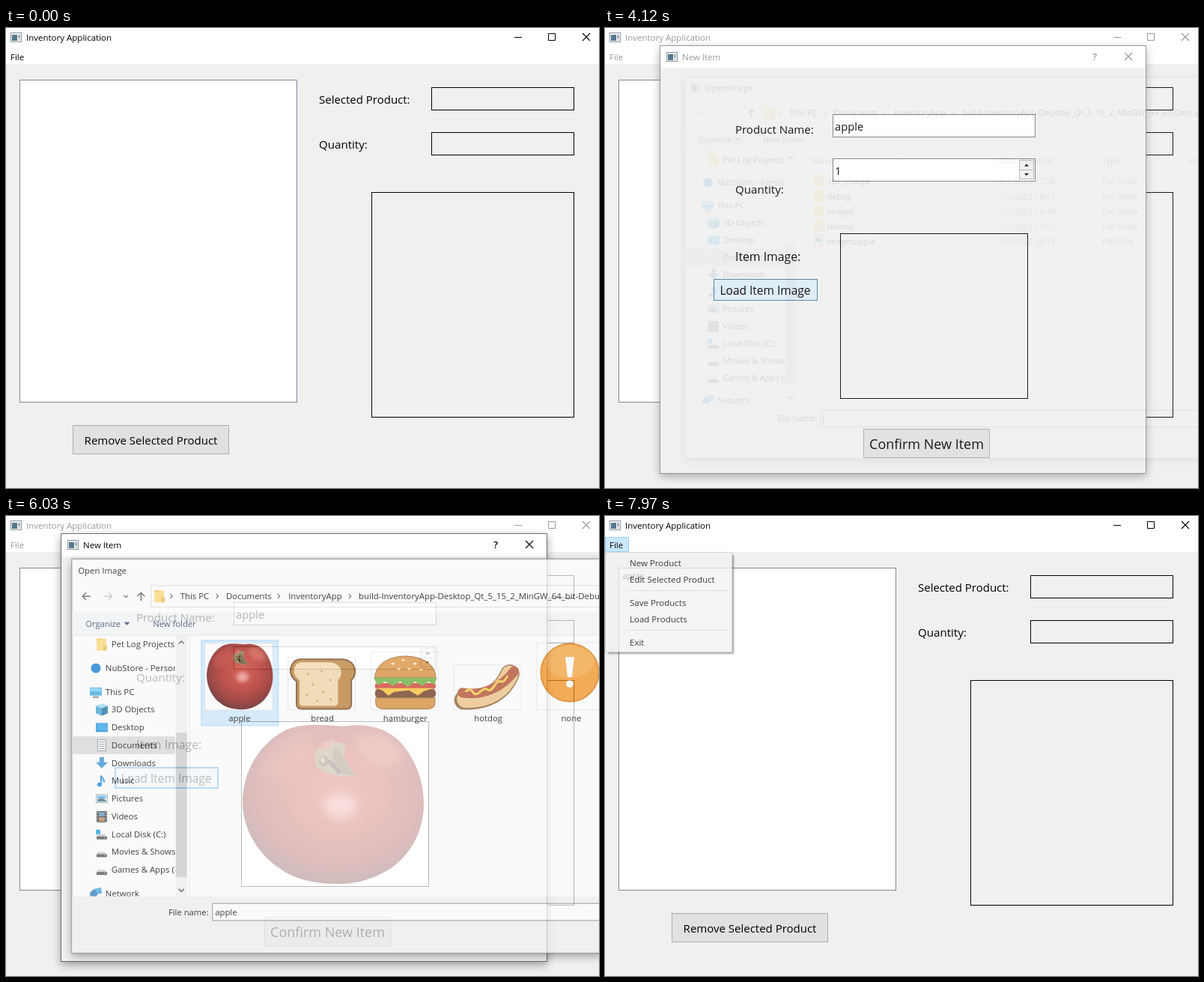
An HTML page that plays this animation: 792 px wide and 614 px high, repeating every 8 s.

```html
<!DOCTYPE html>
<html lang="en">
<head>
<meta charset="utf-8">
<title>Inventory Application</title>
<style>
  html, body { margin: 0; width: 100%; height: 100%; overflow: hidden; background: #f0f0f0; }
  svg { display: block; width: 792px; height: 614px; }
  text { font-family: "Open Sans", "Noto Sans", sans-serif; white-space: pre; }
</style>
</head>
<body>
<svg id="stage" viewBox="0 0 792 614" xmlns="http://www.w3.org/2000/svg"></svg>
<script>
const LOOP = 8000;
const BLUE = '#0078d7';

// Markup helpers
const rect = (x, y, w, h, fill, extra = '') =>
  `<rect x="${x}" y="${y}" width="${w}" height="${h}" fill="${fill}" ${extra}/>`;
const box = (x, y, w, h, fill, stroke, extra = '') =>
  rect(x + .5, y + .5, w, h, fill, `stroke="${stroke}" ${extra}`);
const text = (x, y, s, size = 11.5, extra = '') =>
  `<text x="${x}" y="${y}" font-size="${size}" ${extra}>${s}</text>`;
const line = (d, stroke = '#000', width = 1, extra = '') =>
  `<path d="${d}" fill="none" stroke="${stroke}" stroke-width="${width}" ${extra}/>`;
const shape = (d, fill, extra = '') => `<path d="${d}" fill="${fill}" ${extra}/>`;
const oval = (x, y, rx, ry, fill, extra = '') =>
  `<ellipse cx="${x}" cy="${y}" rx="${rx}" ry="${ry}" fill="${fill}" ${extra}/>`;
const group = (id, body, extra = '') => `<g id="${id}" ${extra}>${body}</g>`;
const centered = 'text-anchor="middle"';
const cross = (x, y) => line(`M${x} ${y}l10 10m0 -10l-10 10`, 'currentColor', 1.1);
const chevron = (x, y) => line(`M${x - 1.5} ${y - 3}l3 3l-3 3`, '#555', 1.2);

const appIcon = (x, y) => box(x, y, 14, 12, '#f6f7f8', '#8d949a') +
  rect(x + 2, y + 3, 7, 8, '#53798c') + rect(x + 10, y + 3, 3, 5, '#a9b4bb') +
  rect(x + 10, y + 9, 3, 2, '#ced4d8');
const folder = (x, y) => rect(x, y, 13, 16, '#ffd978', 'rx="1"') +
  shape(`M${x + 9} ${y + 9}h5v7h-5z`, '#edbd4f') + rect(x, y, 6, 2, '#f2c65a');

const shadow = (id, x, y, w, h) =>
  rect(x, y + 4, w, h, '#000', `id="${id}" filter="url(#soft)"`);

// Apple drawn at the size of the preview box
const apple =
  shape(`M316 375C320 330 345 300 375 285C400 276 430 279 450 281C480 276 505 282 525 300
    C548 325 558 355 558 385C558 430 530 465 500 478C480 488 460 492 437 491
    C410 490 385 485 365 470C335 450 314 415 316 375Z`, 'url(#skin)') +
  oval(375, 322, 42, 22, '#d8372a', 'opacity=".4" filter="url(#blur)" transform="rotate(-35 375 322)"') +
  oval(500, 312, 34, 20, '#e2604c', 'opacity=".55" filter="url(#blur)" transform="rotate(25 500 312)"') +
  oval(447, 387, 22, 16, '#f0a09a', 'opacity=".85" filter="url(#blur)"') +
  shape('M412 318C418 303 440 296 456 307C446 315 455 333 467 345C448 350 429 345 414 334Z', '#84693b') +
  shape('M438 309C450 311 453 333 465 345C448 347 440 340 436 331Z', '#594322') +
  shape('M424 301l14 -3l-5 13l-13 2z', '#c1463a') +
  line('M423 327C432 324 436 333 446 343', '#35200f', 5) +
  oval(424, 327, 6, 7, '#3d2a14') + oval(423, 326, 3, 4, '#a48a55');

// Main window
const mainWindow =
  rect(0, 0, 792, 614, '#f0f0f0') + rect(0, 0, 792, 48, '#fff') + appIcon(6, 6) +
  box(0, 28, 31, 19, '#e5f3ff', '#cce8ff', 'id="fileHot"') +
  group('mainBar', text(27, 17, 'Inventory Application', 11.5, 'fill="currentColor"') +
    text(6, 43, 'File', 11.5, 'fill="currentColor"') +
    line('M679 12.5h10M724.5 7.5h9v9h-9z', 'currentColor') + cross(770, 7)) +
  box(18, 69, 370, 430, '#fff', '#828790') +
  rect(20, 71, 367, 17, '#e5f3ff', 'id="listHover"') +
  text(23.5, 84, 'apple', 10.9, 'id="listItem"') +
  text(418, 101, 'Selected Product:', 15) + text(418, 161, 'Quantity:', 15.1) +
  box(568, 79, 190, 30, 'none', '#000') + box(568, 139, 190, 30, 'none', '#000') +
  box(488, 219, 270, 300, 'none', '#000') +
  box(89, 530, 208, 38, '#e1e1e1', '#adadad') +
  text(193.5, 556, 'Remove Selected Product', 15, centered);

const menuItems = [['New Product', 67], ['Edit Selected Product', 89], ['Save Products', 120],
  ['Load Products', 142], ['Exit', 173]];
const menu =
  rect(4, 52, 168, 132, '#000', 'opacity=".45" filter="url(#menuSoft)"') +
  box(0, 48, 169, 133, '#f2f2f2', '#ccc') +
  rect(3, 52, 164, 22, '#91c9f7', 'id="menuHover"') +
  line('M29 99.5h137M29 152.5h137', '#d7d7d7') +
  menuItems.map(([s, y]) => text(33, y, s)).join('');

// New item window
const itemWindow =
  shadow('itemShadow', 73, 23, 650, 572) +
  box(73, 23, 649, 571, '#f0f0f0', '#6d6d6d', 'id="itemFrame"') +
  rect(74, 24, 648, 30, '#fff') + appIcon(82, 32) +
  group('itemBar', text(103, 43, 'New Item', 11.5, 'fill="currentColor"') +
    text(654, 43, '?', 12.5, `fill="currentColor" font-weight="600" ${centered}`) + cross(694, 33)) +
  text(174, 141, 'Product Name:', 15) + text(174, 221, 'Quantity:', 15.1) +
  text(174, 311, 'Item Image:', 15.8) +
  box(304, 115, 270, 30, '#fff', BLUE, 'id="nameField"') +
  text(307, 137, '', 14.7, 'id="nameText"') + rect(307, 121, 1, 19, '#000', 'id="nameCaret"') +
  box(304, 174, 270, 30, '#fff', '#7a7a7a') + text(307, 196, '1', 15) +
  box(553, 176, 19, 13, '#f0f0f0', '#b4b4b4') + box(553, 189, 19, 12, '#f0f0f0', '#b4b4b4') +
  shape('M560 184.5h6l-3 -3zM560 194h6l-3 3z', '#000') +
  rect(145, 335, 139, 29, '#e1e1e1', 'id="loadButton"') +
  text(214, 356, 'Load Item Image', 15.5, centered) +
  group('preview', rect(315, 275, 249, 219, '#fff') + apple) +
  box(314, 274, 250, 220, 'none', '#000') +
  rect(345, 535, 169, 39, '#e1e1e1', 'id="confirmButton"') +
  text(429.5, 562, 'Confirm New Item', 18, centered);

// Sidebar icons, drawn from the left edge x and the row centre y
const screen = (x, y) => rect(x, y - 6, 16, 11, '#39a9e8') + rect(x + 1, y - 5, 14, 4, '#7fd0f7') +
  rect(x + 4, y + 6, 8, 2, '#6a7b88');
const disk = (x, y) => shape(`M${x + 2} ${y}h10l3 4h-14z`, '#c9ccce') + rect(x + 1, y + 3, 14, 4, '#4b4f53') +
  rect(x + 11, y + 4, 2, 1, '#7ee08a');
const icons = {
  folder: (x, y) => folder(x + 1, y - 8),
  cloud: (x, y) => oval(x + 8, y, 6.5, 6.5, '#0a78d0'),
  pc: screen,
  cube: (x, y) => shape(`M${x} ${y - 5}l8 -3l8 3v10l-8 3l-8 -3z`, '#3ba5d8') +
    shape(`M${x + 8} ${y - 2}l8 -3v10l-8 3z`, '#1c6f9f') + shape(`M${x} ${y - 5}l8 -3l8 3l-8 3z`, '#9adcf2'),
  desk: (x, y) => rect(x, y - 6, 16, 12, '#0f7fcd') + rect(x + 1, y - 5, 14, 9, '#27a3ea'),
  doc: (x, y) => box(x + 2, y - 8, 11, 15, '#fff', '#80878d') +
    line(`M${x + 4} ${y - 4.5}h8m-8 3h8m-8 3h8m-8 3h8`, '#6f8ea6'),
  down: (x, y) => shape(`M${x + 5} ${y - 8}h6v7h5l-8 8l-8 -8h5z`, '#2f8fd6'),
  note: (x, y) => line(`M${x + 7} ${y + 4}v-11c1 4 5 4 4 9`, '#1686d9', 2) + oval(x + 5, y + 5, 3.2, 2.6, '#1686d9'),
  picture: (x, y) => box(x, y - 6, 15, 11, '#fff', '#87949e') + rect(x + 2, y - 4, 12, 4, '#65b6e6') +
    shape(`M${x + 2} ${y + 4}v-3l6 -2l6 3v2z`, '#3d6e84'),
  film: (x, y) => rect(x + 1, y - 7, 14, 15, '#333') + rect(x + 4, y - 6, 8, 6, '#5a8fc0') +
    rect(x + 4, y + 1, 8, 6, '#b87f58') + line(`M${x + 2.5} ${y - 6}v14m11 -14v14`, '#ddd', 1, 'stroke-dasharray="2 2"'),
  system: (x, y) => disk(x, y) + rect(x, y - 6, 6, 6, '#18a0e0'),
  disk,
  net: (x, y) => rect(x + 4, y - 7, 12, 8, '#4aa6dd', `transform="rotate(-12 ${x + 10} ${y - 3})"`) +
    oval(x + 5, y + 1, 5, 5, '#2f7fb8')
};
const places = [[170, 'folder', 'Pet Log Projects', 1], [202, 'cloud', 'NubStore - Personal'], [234, 'pc', 'This PC'],
  [258, 'cube', '3D Objects', 1], [282, 'desk', 'Desktop', 1], [306, 'doc', 'Documents', 1],
  [330, 'down', 'Downloads', 1], [354, 'note', 'Music', 1], [378, 'picture', 'Pictures', 1],
  [402, 'film', 'Videos', 1], [426, 'system', 'Local Disk (C:)', 1], [450, 'disk', 'Movies &amp; Shows', 1],
  [474, 'disk', 'Games &amp; Apps (D:)', 1], [506, 'net', 'Network']];
const sidebar = `<g clip-path="url(#sideClip)">` + rect(82, 294, 139, 24, '#d9d9d9') +
  places.map(([y, icon, label, level = 0]) =>
    icons[icon](106 + 8 * level, y) + text(127 + 8 * level, y + 4, label)).join('') + '</g>' +
  rect(222, 158, 15, 352, '#f0f0f0') + rect(222, 289, 15, 195, '#cdcdcd') +
  line('M226 169l3.5 -3.5l3.5 3.5M226 500l3.5 3.5l3.5 -3.5', '#505050', 1.6) + line('M240.5 158v352', '#e6e6e6');

const crumbs = [[228, 'This PC'], [290, 'Documents'], [374, 'InventoryApp'],
  [469, 'build-InventoryApp-Desktop_Qt_5_15_2_MinGW_64_bit-Debug']];
const navigation =
  group('backArrow', line('M107 105h-11m5 -5l-5 5l5 5', 'currentColor', 1.5)) +
  line('M125 105h11m-5 -5l5 5l-5 5', '#c4c4c4', 1.5) +
  group('recent', line('M151.5 103.5l3 3l3 -3', 'currentColor', 1.2)) +
  line('M175 111v-11m-5 5l5 -5l5 5', '#555', 1.6) +
  box(188, 90, 640, 29, '#fff', '#d9d9d9') + folder(193, 97) +
  [216, 278, 361, 457].map(x => chevron(x, 105)).join('') +
  crumbs.map(([x, s]) => text(x, 109, s)).join('') +
  rect(82, 127, 710, 31, '#f5f6f7') + line('M82 157.5h710', '#e3e5e8') +
  text(100, 146, 'Organize', 11.4, 'fill="#1e395b"') + shape('M152 140h8l-4 4z', '#1e395b') +
  text(191, 146, 'New folder', 11.4, 'fill="#1e395b"');

const files = [['.qtc_clangd', '5/1/2023 13:58'], ['debug', '5/3/2023 18:47'], ['images', '5/3/2023 18:49'],
  ['release', '5/1/2023 14:52'], ['imagesapple', '5/1/2023 20:12']];
const details =
  rect(256, 210, 560, 21, '#e5f3ff', 'id="rowHover"') +
  [[259, 'Name'], [520, 'Date modified'], [664, 'Type'], [784, 'Size']]
    .map(([x, s]) => text(x, 175, s, 11.4, 'fill="#4c5866"')).join('') +
  line('M513.5 158v26M657.5 158v26M777.5 158v26', '#e2e2e2') + line('M380 162l3.5 -3.5l3.5 3.5', '#666') +
  files.map(([name, date], i) => {
    const y = 200 + 21 * i, last = i === 4;
    return (last ? box(262, y - 9, 11, 15, '#fff', '#7a838b') + rect(264, y - 5, 8, 8, '#2f86c8') +
        shape(`M264 ${y + 3}l3 -4l5 4z`, '#fff') : folder(262, y - 9)) +
      text(280, y + 4, name) + text(520, y + 4, date, 11.3, 'fill="#6d6d6d"') +
      text(664, y + 4, last ? 'PNG File' : 'File folder', 11.3, 'fill="#6d6d6d"');
  }).join('');

const bread = shape('M14 190H72C92 192 92 212 84 218V250Q84 257 77 257H18Q10 257 10 250V220C-4 210 2 191 14 190Z',
    '#b9792f', 'stroke="#6d431c" stroke-width="2"') +
  shape('M16 194H56C72 196 74 212 66 218V248Q66 253 60 253H20Q14 253 14 248V218C2 210 6 195 16 194Z', '#f0d5a6') +
  [[26, 210], [44, 206], [56, 218], [32, 224], [24, 238], [46, 234], [56, 244], [38, 246]]
    .map(([x, y]) => oval(x, y, 1.6, 1.6, '#c99c5c')).join('');
const burger = shape('M4 215C4 176 86 176 86 215Z', '#d68c35', 'stroke="#8d5319"') +
  [[28, 196], [42, 191], [58, 196], [36, 203], [66, 204], [50, 203]]
    .map(([x, y]) => oval(x, y, 2.4, 1.4, '#fbe3b0')).join('') +
  rect(4, 222, 82, 8, '#cf3b2a', 'rx="3"') +
  shape('M2 215H88L84 224L76 220L68 226L58 220L48 227L38 220L28 226L18 220L8 225Z', '#67ad35') +
  rect(4, 230, 82, 12, '#6b3419', 'rx="5"') + shape('M6 229H84L70 233L62 239L50 232L30 234L22 239L14 232Z', '#fbc02d') +
  shape('M5 242H85V249Q85 257 74 257H16Q5 257 5 249Z', '#d68c35', 'stroke="#8d5319"');
const hotdog = line('M16 247C46 248 68 236 78 212', '#8b5a2c', 26, 'stroke-linecap="round" transform="translate(-4 -2)"') +
  line('M14 244C44 245 65 232 74 210', '#eec283', 23, 'stroke-linecap="round"') +
  line('M10 235C40 240 65 226 80 206', '#b2492a', 13, 'stroke-linecap="round"') +
  line('M14 234q6 -6 10 0t10 0t10 -3t9 -5t9 -6t9 -8', '#f8c83a', 3);
const notice = oval(43, 208, 39, 39, '#f4921e', 'stroke="#d97a10" stroke-width="2"') +
  oval(43, 193, 33, 22, '#f9b355', 'opacity=".5"') + shape('M37 187h12l-3 27h-6z', '#fff') + oval(43, 223, 5, 5, '#fff');
const smallApple = `<g transform="translate(0 169) scale(.369 .418) translate(-314 -279)">${apple}</g>`;
const thumbs = [['apple', 169, smallApple], ['bread', 188, bread], ['hamburger', 181, burger],
  ['hotdog', 198, hotdog], ['none', 168, notice]];
const tiles = box(256, 164, 104, 115, '#e5f3ff', '#e5f3ff', 'id="tile"') +
  thumbs.map(([name, top, art], i) => `<g transform="translate(${263 + 112 * i} 0)">` +
    box(-2, top - 1, 91, 259 - top, '#fff', '#e6e6e6') + art + text(45, 274, name, 11.4, centered) + '</g>').join('');

const openDialog =
  shadow('dialogShadow', 81, 54, 800, 533) +
  box(81, 54, 800, 532, '#fff', '#6d6d6d') +
  group('dialogIcon', appIcon(90, 63)) + text(111, 74, 'Open Image', 11.5, 'id="dialogTitle"') +
  navigation + sidebar + group('details', details) + group('tiles', tiles) +
  rect(82, 510, 740, 76, '#f0f0f0') + text(212, 535, 'File name:', 11.4) +
  box(271, 519, 560, 23, '#fff', BLUE, 'id="fileField"') +
  text(275, 535, 'apple', 11.4, 'id="fileText"') + rect(275, 524, 1, 15, '#000', 'id="fileCaret"');

const stage = document.getElementById('stage');
stage.innerHTML = `<defs>
  <filter id="soft" x="-10%" y="-10%" width="120%" height="120%"><feGaussianBlur stdDeviation="6"/></filter>
  <filter id="menuSoft"><feGaussianBlur stdDeviation="1.2"/></filter>
  <filter id="blur" x="-60%" y="-60%" width="220%" height="220%"><feGaussianBlur stdDeviation="7"/></filter>
  <clipPath id="sideClip"><rect x="82" y="158" width="139" height="352"/></clipPath>
  <radialGradient id="skin" cx=".53" cy=".42" r=".6">
    <stop offset="0" stop-color="#c9301f"/><stop offset=".45" stop-color="#b01c13"/>
    <stop offset=".78" stop-color="#840d0a"/><stop offset="1" stop-color="#430707"/>
  </radialGradient></defs>` +
  mainWindow + group('menu', menu) + group('itemWindow', itemWindow) + group('openDialog', openDialog);

// Animation
const parts = {};
stage.querySelectorAll('[id]').forEach(el => { parts[el.id] = el; });
const set = (id, attrs) => { for (const key in attrs) parts[id].setAttribute(key, attrs[key]); };
const show = (id, opacity) => set(id, { opacity: +opacity, display: opacity > 0 ? 'inline' : 'none' });
const tint = (id, color) => set(id, { color });
const ramp = (t, a, b) => Math.min(1, Math.max(0, (t - a) / (b - a)));
const within = (t, a, b) => t >= a && t < b;

function animateWindow(id, t, cx, cy, [open, opened], [close, closed]) {
  const p = ramp(t, open, opened), q = ramp(t, close, closed);
  const opacity = t < open ? 0 : (.1 + .9 * p) * (1 - q ** 1.3);
  const scale = 1 - .043 * (1 - p) ** 2 - .05 * q ** 1.5;
  show(id, opacity);
  set(id, { transform: `translate(${cx} ${cy}) scale(${scale}) translate(${-cx} ${-cy})` });
}

function styleButton(id, x, y, w, h, fill, stroke, width) {
  const inset = width / 2;
  set(id, { x: x + inset, y: y + inset, width: w - width, height: h - width, fill, stroke, 'stroke-width': width });
}

const keyTimes = [2320, 2450, 2620, 2720, 2880];
const caretStops = [307, 315, 324, 333, 337, 345];

function render(t) {
  // Main window and its menu
  tint('mainBar', within(t, 1080, 6960) ? '#999' : '#000');
  const pressed = within(t, 550, 1080) || t >= 7790;
  show('fileHot', within(t, 320, 1080) || pressed);
  set('fileHot', pressed ? { fill: '#cce8ff', stroke: '#99d1ff' } : { fill: '#e5f3ff', stroke: '#cce8ff' });
  show('menu', t < 4000 ? ramp(t, 540, 790) * (1 - ramp(t, 1080, 1200)) : ramp(t, 7780, 8030));
  show('menuHover', within(t, 800, 1200));
  show('listItem', t >= 6960);
  show('listHover', within(t, 7540, 7620));

  // New item window
  animateWindow('itemWindow', t, 398, 309, [1080, 1370], [6960, 7210]);
  const active = !within(t, 3710, 5940);
  const focus = 1 - ramp(t, 3710, 3960) + ramp(t, 5940, 6190);
  tint('itemBar', active ? '#000' : '#999');
  set('itemFrame', { stroke: active ? '#6d6d6d' : '#999' });
  set('itemShadow', { opacity: .28 + .22 * focus });
  const typed = keyTimes.filter(k => t >= k).length;
  parts.nameText.textContent = 'apple'.slice(0, typed);
  set('nameCaret', { x: caretStops[typed] });
  show('nameCaret', t < 1600 || within(t, 2110, 3530));
  set('nameField', { stroke: t < 3710 ? BLUE : '#7a7a7a' });
  const loadHot = within(t, 3710, 6190), loadFocus = within(t, 5940, 6830);
  styleButton('loadButton', 145, 335, 139, 29, loadHot ? '#dcebf6' : '#e1e1e1',
    loadFocus ? BLUE : loadHot ? '#4a7a9c' : '#adadad', loadFocus ? 2 : 1);
  const confirmHot = t >= 6830, confirmFocus = t < 3710 || confirmHot;
  styleButton('confirmButton', 345, 535, 169, 39, confirmHot ? '#e5f1fb' : '#e1e1e1',
    confirmFocus ? BLUE : '#adadad', confirmFocus ? 2 : 1);
  show('preview', t >= 5940);

  // Open image dialog
  animateWindow('openDialog', t, 660, 308, [4120, 4370], [5940, 6190]);
  set('dialogShadow', { opacity: .45 });
  const closing = t >= 5940, inFolder = t >= 5190;
  show('dialogIcon', !closing);
  set('dialogTitle', { x: closing ? 90 : 111 });
  tint('backArrow', inFolder ? '#555' : '#c4c4c4');
  tint('recent', inFolder ? '#555' : '#c4c4c4');
  show('details', !inFolder);
  show('rowHover', t >= 4300);
  set('rowHover', { y: t < 4820 ? 210 : 231, fill: t < 5040 ? '#e5f3ff' : '#cce8ff' });
  show('tiles', t >= 5260);
  show('tile', t < 5460 ? 0 : t < 5590 ? .5 : 1);
  set('tile', t < 5750 ? { fill: '#e5f3ff', stroke: '#e5f3ff' } : { fill: '#cce8ff', stroke: '#99d1ff' });
  set('fileField', { stroke: t < 5040 ? BLUE : '#7a7a7a' });
  show('fileCaret', t < 4620);
  show('fileText', t >= 5750);
}

const start = performance.now();
function tick() {
  render((performance.now() - start) % LOOP);
  requestAnimationFrame(tick);
}
tick();
</script>
</body>
</html>
```
